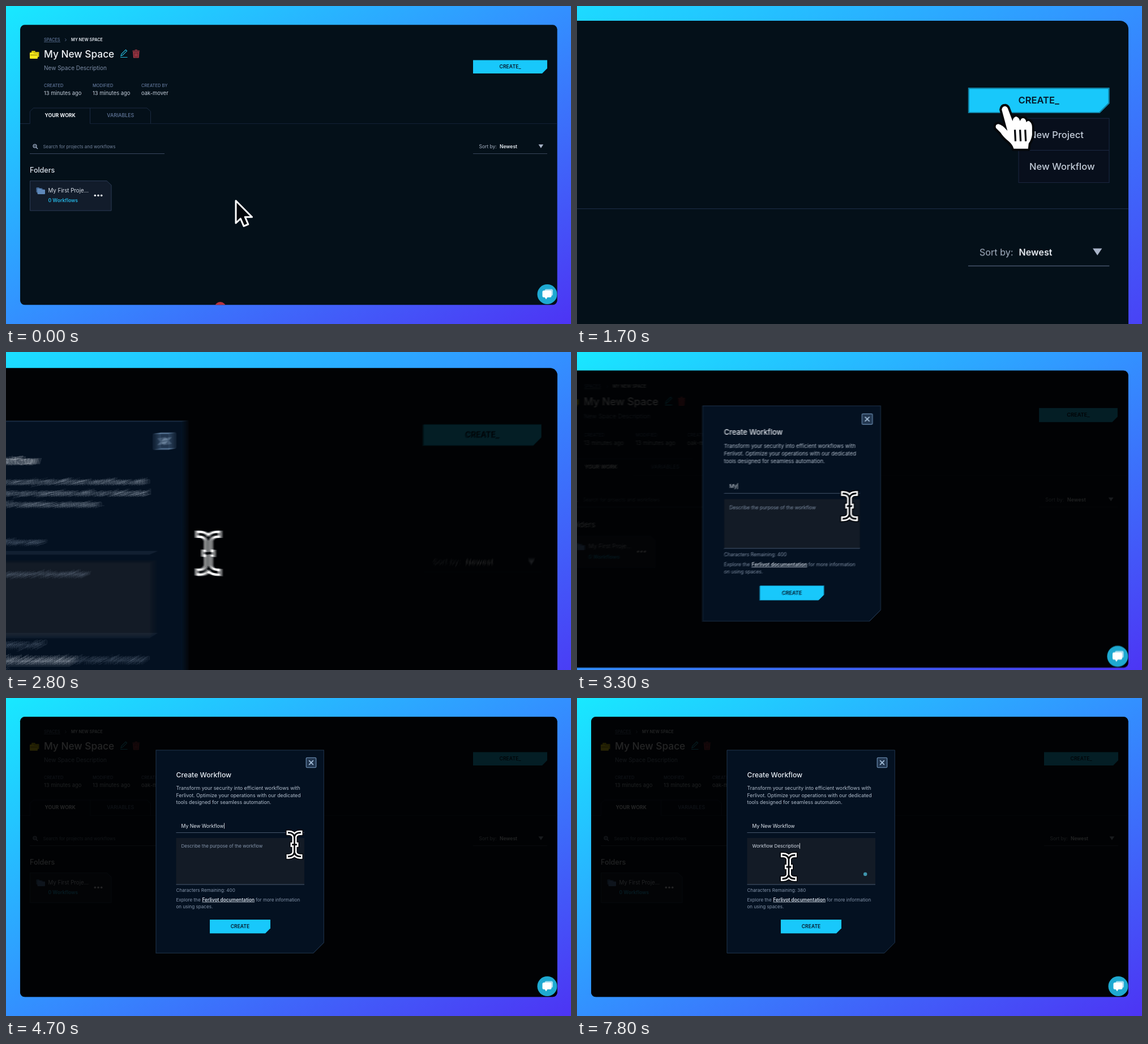
An HTML page with a canvas for the animation above (8000 ms loop, 998 by 561 pixels).

```html
<!DOCTYPE html>
<html lang="en">
<head>
<meta charset="utf-8">
<title>Create a workflow</title>
<style>
  html, body { margin: 0; width: 100%; height: 100%; overflow: hidden; background: #3490ff; }
  canvas { display: block; width: 998px; height: 561px; }
</style>
</head>
<body>
<canvas id="stage"></canvas>
<script>
const W = 998, H = 561, LOOP = 8000, STEP = 100;
const FONT = 'Inter, "Open Sans", sans-serif';
const CYAN = '#18c8fb';
const dpr = window.devicePixelRatio || 1;

function sized(canvas) {
  canvas.width = W * dpr;
  canvas.height = H * dpr;
  return canvas;
}
const stage = sized(document.getElementById('stage'));
const out = stage.getContext('2d');
const layer = sized(document.createElement('canvas'));
const g = layer.getContext('2d');

// Timing
const MENU = [1500, 2350], MODAL = 2350, FOCUS = 5250;
const NAME = 'My New Workflow', NAME_START = 3100;
const NOTE = 'Workflow Description', NOTE_START = 5400;
const ZOOM = { gain: 0.92, rate: 0.00633, start: 750, end: 2604, x: 973.3, y: 41.5 };
const HOME = [405, 342];
const MOVES = [ // start, end, x, y
  [350, 1350, 858.8, 112],
  [1800, 2100, 888, 158],
  [2400, 2965, 509.5, 258.7],
  [4700, 5200, 374, 298]
];

const clamp = v => Math.max(0, Math.min(1, v));
const ease = u => u * u * (3 - 2 * u);
const spring = ms => ms <= 0 ? 0 : 1 - (1 + ZOOM.rate * ms) * Math.exp(-ZOOM.rate * ms);
const zoomAt = t => 1 + ZOOM.gain * (spring(t - ZOOM.start) - spring(t - ZOOM.end));
const typed = (text, start, t) => text.slice(0, Math.max(0, Math.floor((t - start) / 100)));

function mouseAt(t) {
  let [x, y] = HOME;
  for (const [a, b, tx, ty] of MOVES) {
    const k = ease(clamp((t - a) / (b - a)));
    x += (tx - x) * k;
    y += (ty - y) * k;
  }
  return [x, y];
}

// Drawing helpers
function text(str, x, y, size, color, weight = 400, align = 'left') {
  g.font = `${weight} ${size}px ${FONT}`;
  g.textAlign = align;
  g.fillStyle = color;
  g.fillText(str, x, y);
  return g.measureText(str).width;
}
function poly(points, fill, stroke, width = 1, closed = true) {
  g.beginPath();
  points.forEach(([x, y]) => g.lineTo(x, y));
  if (closed) g.closePath();
  if (fill) { g.fillStyle = fill; g.fill(); }
  if (stroke) { g.strokeStyle = stroke; g.lineWidth = width; g.stroke(); }
}
const line = (x1, y1, x2, y2, color, width = 1) => poly([[x1, y1], [x2, y2]], null, color, width, false);
function dot(x, y, r, color) {
  g.beginPath();
  g.arc(x, y, r, 0, Math.PI * 2);
  g.fillStyle = color;
  g.fill();
}
function round(x, y, w, h, r, fill, stroke, width = 1) {
  g.beginPath();
  g.roundRect(x, y, w, h, r);
  if (fill) { g.fillStyle = fill; g.fill(); }
  if (stroke) { g.strokeStyle = stroke; g.lineWidth = width; g.stroke(); }
}
const notched = (x, y, r, b, cut) => [[x, y], [r, y], [r, b - cut], [r - cut, b], [x, b]];

// The gradient grows a little around its centre as the camera zooms in.
function backdrop(zoom) {
  const len = Math.hypot(W, H), reach = W * H / len * (1 + 0.2 * (zoom - 1));
  const dx = H / len * reach, dy = W / len * reach;
  const fill = g.createLinearGradient(W / 2 - dx, H / 2 - dy, W / 2 + dx, H / 2 + dy);
  fill.addColorStop(0, '#18e9ff');
  fill.addColorStop(0.5, '#3390ff');
  fill.addColorStop(1, '#4d34f4');
  g.fillStyle = fill;
  g.fillRect(0, 0, W, H);
}

function folderIcon(x, y, w, h, color) {
  round(x, y, w * 0.5, h * 0.5, 1.2, color);
  round(x, y + h * 0.18, w, h * 0.82, 1.2, color);
}

function header() {
  text('SPACES', 67, 62, 7.4, '#62779b', 500);
  line(67, 63.5, 96, 63.5, '#62779b', 0.7);
  poly([[104.3, 57.5], [106.5, 59.7], [104.3, 62]], null, '#62779b', 0.9, false);
  text('MY NEW SPACE', 115, 62, 7.2, '#e6ebf2', 600);

  folderIcon(45, 79, 13.5, 11, '#cdbf10');
  folderIcon(42, 82, 14, 11, '#f7e71c');
  line(43, 86.5, 55, 86.5, '#6e6608', 0.8);
  text('My New Space', 67, 91, 17.3, '#f1f4f8', 500);

  poly([[203, 88], [204, 84.5], [211.5, 77.3], [213.6, 79.3], [206, 86.7]], null, '#25b9da', 1.1);
  line(202, 90.5, 214.5, 90.5, '#25b9da', 1.2);
  line(223.5, 79.5, 236, 79.5, '#b83c4b', 1.4);
  line(227.5, 77.5, 232, 77.5, '#b83c4b', 1.2);
  poly([[224.8, 81.5], [234.8, 81.5], [234, 91], [225.6, 91]], '#6d2430', '#b83c4b', 1.2);
  for (const x of [228, 229.8, 231.6]) line(x, 83.5, x, 89, '#c8505c', 0.7);

  text('New Space Description', 67, 112.5, 10, '#7e8ea8');
  const facts = [[67, 'CREATED', '13 minutes ago'], [153, 'MODIFIED', '13 minutes ago'], [239, 'CREATED BY', 'oak-mover']];
  for (const [x, label, value] of facts) {
    text(label, x, 143, 7.5, '#62779b', 500);
    text(value, x, 157, 9.4, '#c3ccd9');
  }
}

function page(t) {
  const menuOpen = t >= MENU[0] && t < MENU[1];
  header();

  poly(notched(825, 95.5, 956, 119, 9), CYAN);
  if (menuOpen) poly(notched(825.5, 96, 955.5, 118.5, 8.8), null, '#117d9e', 1);
  text('CREATE_', 890.5, 110, 8.7, '#06182a', 600, 'center');

  const edge = '#1a2941';
  poly([[25, 207.5], [42.3, 207.5], [42.3, 186], [48.5, 180], [249, 180], [255.5, 186], [255.5, 207.5]], null, edge, 1, false);
  line(148.5, 180, 148.5, 207.5, edge);
  line(148.5, 207.5, 974, 207.5, edge, 0.7);
  text('YOUR WORK', 95.7, 196.3, 8.7, '#f1f4f8', 700, 'center');
  text('VARIABLES', 202.3, 196.3, 8.8, '#62779b', 500, 'center');

  g.beginPath();
  g.arc(51, 247, 2.9, 0, Math.PI * 2);
  g.strokeStyle = '#9aa9c0';
  g.lineWidth = 1.4;
  g.stroke();
  line(53.2, 249.2, 56, 252, '#9aa9c0', 1.5);
  dot(51, 247, 1.1, '#9aa9c0');
  text('Search for projects and workflows', 65.5, 251, 7.9, '#73839c');
  line(42, 260.5, 280, 260.5, '#3a485f');

  text('Sort by:', 835.5, 251, 8.5, '#aab5c6');
  text('Newest', 872, 251, 8.5, '#e9edf3', 600);
  poly([[940.6, 244.3], [949.2, 244.3], [944.9, 250.7]], '#a9b4c8');
  line(825, 260.5, 956, 260.5, '#46536a', 0.8);

  text('Folders', 42, 294, 12.5, '#dde3ec', 500);
  poly([[42.5, 308.5], [178, 308.5], [186, 316], [186, 361], [42.5, 361]], '#121c2b', '#2a3a54');
  folderIcon(53.5, 320, 11, 9, '#3f6390');
  folderIcon(55.5, 322, 13.5, 10, '#5f88ba');
  text('My First Proje...', 74.5, 328.7, 9.7, '#d5dce6');
  text('0 Workflows', 74.5, 346.2, 8.6, '#25b3e0', 600);
  for (const x of [157.3, 163, 168.7]) dot(x, 334.3, 1.75, '#f1f4f8');

  if (t < 200) dot(378.5, 532 + t * 0.06, 10, '#b5333f');

  if (menuOpen) {
    g.fillStyle = '#080f1c';
    g.fillRect(871.8, 123.8, 84, 59.5);
    g.strokeStyle = '#1b2740';
    g.lineWidth = 0.6;
    g.strokeRect(871.8, 123.8, 84, 59.5);
    line(871.8, 153.4, 955.8, 153.4, '#1b2740', 0.6);
    text('New Project', 881.8, 142.2, 8.7, '#c3ccd9', 500);
    text('New Workflow', 881.8, 171.6, 8.7, '#c3ccd9', 500);
  }
}

function caret(x, y) {
  g.fillStyle = '#f1f4f8';
  g.fillRect(x + 0.4, y - 8, 0.8, 10);
}

function modal(t) {
  const name = typed(NAME, NAME_START, t), note = typed(NOTE, NOTE_START, t);
  const body = '#b3bfce', soft = '#8595ab';

  poly(notched(265, 92, 561.3, 450, 18.5), '#041121', '#21364f');
  round(530.3, 105.3, 17.4, 17.4, 1.5, '#22364f', '#6585a8', 1.3);
  line(535.2, 110.2, 542.8, 117.8, '#a5bfda', 1.7);
  line(542.8, 110.2, 535.2, 117.8, '#a5bfda', 1.7);

  text('Create Workflow', 300.5, 140.2, 12.2, '#e9eef5', 500);
  ['Transform your security into efficient workflows with',
   'Ferlivot. Optimize your operations with our dedicated',
   'tools designed for seamless automation.'
  ].forEach((row, i) => text(row, 300.5, 162 + i * 12.5, 8.8, body));

  let w = text(name, 309.5, 228.5, 8.7, '#e3e9f1');
  if (!name) text('Enter the workflow name', 309.5, 228.5, 8.1, soft);
  if (t >= 3000 && t < FOCUS) caret(309.5 + w, 228.5);
  line(300.5, 237.5, 527, 237.5, '#46566c');

  g.fillStyle = '#131b26';
  g.fillRect(300.5, 247, 226.5, 82);
  line(300.5, 329, 527, 329, '#4a5a70');
  w = text(note, 309.5, 264, 8.2, '#d5dde8');
  if (!note) text('Describe the purpose of the workflow', 309.5, 264, 8.05, soft);
  if (t >= FOCUS) {
    caret(309.5 + w, 264);
    dot(509.2, 310.8, 3.2, '#3f95ad');
  }

  text('Characters Remaining: ' + (400 - note.length), 300.5, 342, 8.1, soft);
  text('Explore the', 300.5, 358.6, 8.1, soft);
  w = text('Ferlivot documentation', 346.5, 358.6, 8.3, '#d5dde8', 600);
  line(346.5, 360, 346.5 + w, 360, '#d5dde8', 0.8);
  text('for more information', 441, 358.6, 8.1, soft);
  text('on using spaces.', 300.5, 370.7, 8.1, soft);

  poly(notched(360, 391, 467, 415.3, 9), CYAN);
  text('CREATE', 413.5, 406.2, 8.6, '#06182a', 600, 'center');
}

function chat() {
  dot(956, 508.5, 17.5, '#1ea9d1');
  round(951.5, 499.5, 14.5, 11.5, 2.5, '#a9def0');
  round(947.5, 502, 16, 12, 2.5, '#ffffff');
  poly([[951, 513], [957, 513], [954, 517.5]], '#ffffff');
}

// Pointers, each with its hot spot at 0,0
function arrow() {
  poly([[1, 1.5], [1, 41], [9.3, 33.2], [15, 46.3], [22.8, 43], [17.2, 30.2], [29.5, 30.2]], '#04070b', '#ffffff', 3);
}
function hand() {
  g.scale(1 / 1.88, 1 / 1.88);
  const shape = new Path2D(`M-5 7 Q-4 1 1 1 Q5 2 6 6 L14 27 Q15 20 20 19 Q25 20 27 27 Q29 21 33 22
    Q37 23 38 29 Q41 25 44 28 Q48 31 48 38 L48 51 Q47 59 42 66 L41 75 L16 75 Q14 68 7 62
    Q-2 55 -7 47 L-15 39 Q-17 33 -11 32 Q-4 33 5 44 Z`);
  g.strokeStyle = '#04070b';
  g.lineWidth = 8;
  g.stroke(shape);
  g.fillStyle = '#ffffff';
  g.fill(shape);
  for (const x of [18, 27, 36]) line(x, 42, x + 1, 62, '#04070b', 3.2);
}
function beam() {
  const shape = new Path2D('M-10 -21 Q-2 -21 0 -14 Q2 -21 10 -21 M0 -14 V14 M-10 21 Q-2 21 0 14 Q2 21 10 21 M-3 0 H3');
  g.lineCap = 'square';
  for (const [width, color] of [[11, '#04070b'], [8, '#ffffff'], [2.8, '#04070b']]) {
    g.lineWidth = width;
    g.strokeStyle = color;
    g.stroke(shape);
  }
}
function pointer(t, [x, y]) {
  g.save();
  g.translate(x, y);
  g.lineJoin = 'round';
  if (t >= 2650) beam();
  else if (t >= 1250 && t < 2350) hand();
  else arrow();
  g.restore();
}

// The interface shows time t; camera and pointer are posed at time p.
function scene(t, p) {
  const zoom = zoomAt(p);
  g.setTransform(dpr, 0, 0, dpr, 0, 0);
  backdrop(zoom);
  g.translate(ZOOM.x, ZOOM.y);
  g.scale(zoom, zoom);
  g.translate(-ZOOM.x, -ZOOM.y);

  g.save();
  g.beginPath();
  g.roundRect(25, 33.3, 948.7, 494, 8);
  g.clip();
  g.fillStyle = '#041019';
  g.fillRect(20, 30, 960, 500);
  page(t);
  const shown = clamp((t - MODAL + 50) / 150);
  if (shown) {
    g.globalAlpha = shown;
    g.fillStyle = 'rgba(0, 0, 0, 0.85)';
    g.fillRect(20, 30, 960, 500);
    modal(t);
    g.globalAlpha = 1;
  }
  chat();
  g.restore();
  pointer(t, mouseAt(p));
}

// Motion blur: average several poses inside a short shutter time.
function render(t) {
  const shutter = 14;
  const pose = p => [zoomAt(p), ...mouseAt(p)];
  const a = pose(t - shutter / 2), b = pose(t + shutter / 2);
  const moving = a.some((v, i) => Math.abs(v - b[i]) > (i ? 0.5 : 0.001));
  const count = moving ? 8 : 1;
  for (let i = 0; i < count; i++) {
    scene(t, moving ? t + shutter * (i / (count - 1) - 0.5) : t);
    out.globalAlpha = 1 / (i + 1);
    out.drawImage(layer, 0, 0);
  }
}

const began = performance.now();
let last = -1;
function tick() {
  const t = Math.floor(((performance.now() - began) % LOOP) / STEP) * STEP;
  if (t !== last) render(last = t);
  requestAnimationFrame(tick);
}
tick();
</script>
</body>
</html>
```
